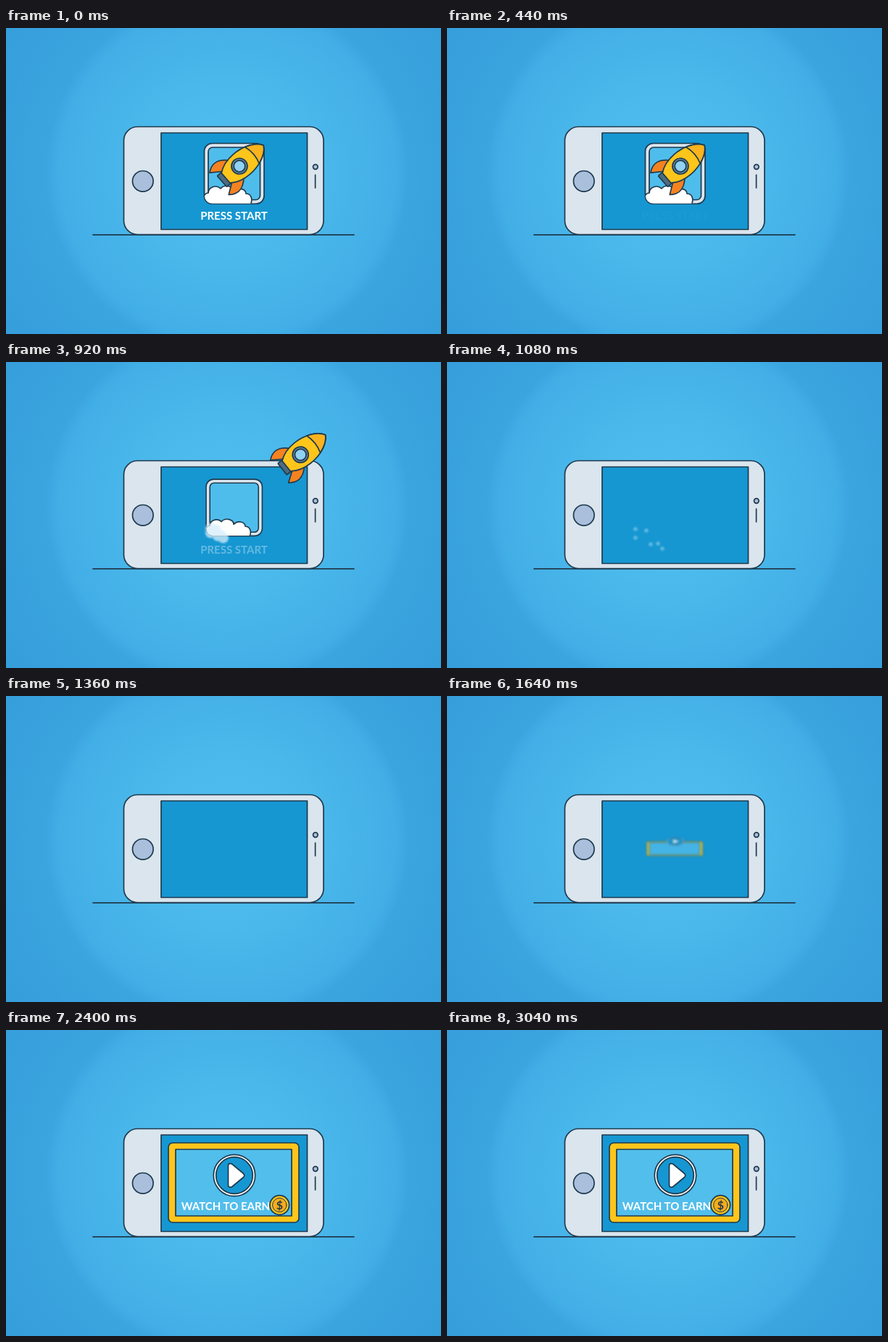
Animation of 600x423 px, one loop 3.84 s. Source, as an HTML page:

```html
<!DOCTYPE html>
<html lang="en">
<head>
<meta charset="utf-8">
<title>Press start, watch to earn</title>
<style>
  html, body { margin: 0; width: 100%; height: 100%; overflow: hidden; }
  body { background: radial-gradient(circle at 305px 200px,
    #51c0f0 0, #4ab8eb 130px, #42aee6 232px, #3ba5e0 250px, #359dda 390px); }
  svg { display: block; width: 600px; height: 423px; }
  .line { stroke: #1f3a4d; stroke-width: 1.7; stroke-linejoin: round; stroke-linecap: round; }
  text { font: 700 15px Lato, "Open Sans", sans-serif; fill: #fff; text-anchor: middle; }
</style>
</head>
<body>
<svg viewBox="0 0 600 423">
  <defs>
    <clipPath id="screenClip"><rect x="215" y="146" width="200" height="132"/></clipPath>
    <clipPath id="iconClip"><rect x="274" y="160" width="81.500" height="82.500" rx="10"/></clipPath>
    <filter id="soft" x="-50%" y="-150%" width="200%" height="400%"><feGaussianBlur stdDeviation="1.2"/></filter>
  </defs>

  <!-- Phone -->
  <g class="line">
    <path d="M120 285.800H480"/>
    <rect x="162.500" y="136.500" width="275.500" height="149" rx="19" fill="#dae5ee"/>
    <circle cx="188.800" cy="211.800" r="14.300" fill="#a9bfdc"/>
    <rect x="214" y="145" width="201.500" height="133.500" fill="#1697d2"/>
    <circle cx="426.800" cy="192" r="3.300" fill="#a9bfdc"/>
    <path d="M426.600 203V221"/>
  </g>

  <!-- Start screen -->
  <g id="icon" class="line">
    <rect x="273.500" y="159.500" width="82.500" height="83.500" rx="11" fill="#dae5ee"/>
    <rect x="279" y="165" width="71.500" height="72.500" rx="6" fill="#4fbdec"/>
    <g clip-path="url(#iconClip)">
      <path fill="#fff" d="M272 245V234C274 229 277 228 279 228C279 220 290 216 296 222
        C302 215 314 219 314 226C321 219 331 223 331 229C338 229 341 236 337 245Z"/>
    </g>
  </g>
  <text id="press" x="314.500" y="265.300">PRESS START</text>
  <g id="puffs" fill="#d5effc" filter="url(#soft)"></g>
  <g id="rocket" class="line">
    <path fill="#f58220" d="M-6 -16C-18 -29 -29 -27 -37 -20L-21 -9ZM-6 16C-18 29 -29 27 -37 20L-21 9Z"/>
    <rect x="-32" y="-10" width="8" height="20" rx="1" fill="#4d6b80"/>
    <path fill="#fec51b" d="M44 0C38 -11 21 -18 4 -18C-8 -18 -19 -14 -25 -9V9C-19 14 -8 18 4 18C21 18 38 11 44 0Z"/>
    <path fill="#fbb31d" d="M44 0C40 -7 32 -12 23 -15Q28 0 23 15C32 12 40 7 44 0Z"/>
    <circle r="11" fill="#66849a"/>
    <circle r="7.800" fill="#8fd2f4"/>
  </g>

  <!-- Reward screen -->
  <g clip-path="url(#screenClip)">
    <g id="reward">
      <g id="frame" class="line">
        <rect x="-90" y="-55" width="180" height="110" rx="6" fill="#fec51b"/>
        <rect x="-80" y="-46" width="160" height="92" fill="#52beec"/>
      </g>
      <g id="play" class="line">
        <circle r="28.700" fill="#fff"/>
        <circle r="25.300" fill="#1697d2"/>
        <path fill="#fff" d="M-8.500 -13C-8.500 -17 -5 -17 -3 -15.500L12 -3Q15.500 0 12 3L-3 15.500C-5 17 -8.500 17 -8.500 13Z"/>
      </g>
    </g>
    <g id="prize">
      <text id="watch" x="303" y="248.800">WATCH TO EARN</text>
      <g id="coin" class="line">
        <circle r="13.300" fill="#fec51b"/>
        <circle r="9.700" fill="#f9ac1b" stroke-width="1"/>
        <text y="5.600" style="font-size:16px;fill:#1f3a4d" stroke="none">$</text>
      </g>
    </g>
  </g>
</svg>
<script>
const LOOP = 3840, STEP = 40;
const el = id => document.getElementById(id);
const [icon, press, puffs, rocket, reward, frame, play, prize, watch, coin] =
  ["icon", "press", "puffs", "rocket", "reward", "frame", "play", "prize", "watch", "coin"].map(el);

const ramp = (t, from, to) => Math.min(1, Math.max(0, (t - from) / (to - from)));
const mix = (a, b, p) => a + (b - a) * p;
const backOut = (p, s = 1.7) => 1 + (s + 1) * (p - 1) ** 3 + s * (p - 1) ** 2;
const move = (node, value) => node.setAttribute("transform", value);
const show = (node, opacity) => node.setAttribute("opacity", opacity);
const scaleAt = (x, y, s) => `translate(${x} ${y}) scale(${s}) translate(${-x} ${-y})`;

const puffEnds = [[260, 231], [275, 233], [260, 243], [281, 252], [291, 251], [297, 258]];
const dots = puffEnds.map(() =>
  puffs.appendChild(document.createElementNS("http://www.w3.org/2000/svg", "circle")));

function drawStart(t) {
  const shrink = ramp(t, 880, 1040);
  move(icon, scaleAt(314.5, 201, 1 - shrink * shrink));
  show(icon, +(shrink < 1));
  show(press, t < 800 ? 0.5 + 0.5 * Math.cos(t / 800 * 2 * Math.PI) : 1 - ramp(t, 840, 960));

  // Lean back, then shoot off along the nose
  const lean = ramp(t, 600, 800), fly = 420 * ramp(t, 800, 1040) ** 2;
  move(rocket, `translate(${322 + 2 * lean} ${191 + 2.5 * lean}) rotate(${-41 + 2.5 * lean}) translate(${fly})`);
  show(rocket, +(t < 1040));

  const burst = ramp(t, 860, 1080), out = 1 - (1 - burst) ** 2;
  show(puffs, t < 860 ? 0 : mix(0.9, 0.38, burst) * (1 - ramp(t, 1080, 1200)));
  dots.forEach((dot, i) => {
    const [x, y] = puffEnds[i];
    dot.setAttribute("cx", mix(302, x, out));
    dot.setAttribute("cy", mix(230, y, out));
    dot.setAttribute("r", mix(9, 2.8, burst));
  });
}

function drawReward(t) {
  const sx = backOut(ramp(t, 1608, 1908)), sy = backOut(ramp(t, 1628, 1920));
  show(reward, t < 1640 ? 0 : mix(0.75, 1, ramp(t, 1640, 1680)));
  reward.style.filter = t < 1720 ? `blur(${1.6 * (1 - ramp(t, 1640, 1720))}px)` : "none";
  move(frame, `translate(314 211) scale(${sx} ${sy})`);
  move(play, `translate(315 201) scale(${sx} ${sy})`);

  const words = ramp(t, 1720, 1900);
  show(watch, words);
  move(watch, scaleAt(303, 243, backOut(words)));
  const pop = ramp(t, 2120, 2400);
  show(coin, +(pop > 0));
  move(coin, `translate(377.3 242) scale(${Math.max(0, backOut(pop, 3))})`);

  // Two wobbling pulses
  const phase = ramp(t, 2400, 3040) * 2 * Math.PI;
  const pulse = 1 + 0.08 * Math.sin(phase) ** 2;
  move(prize, `translate(317 242) rotate(${2.5 * Math.sin(2 * phase)}) scale(${pulse}) translate(-317 -242)`);
}

const start = performance.now();
function tick() {
  const t = Math.floor(((performance.now() - start) % LOOP) / STEP) * STEP;
  drawStart(t);
  drawReward(t);
  requestAnimationFrame(tick);
}
tick();
</script>
</body>
</html>
```
